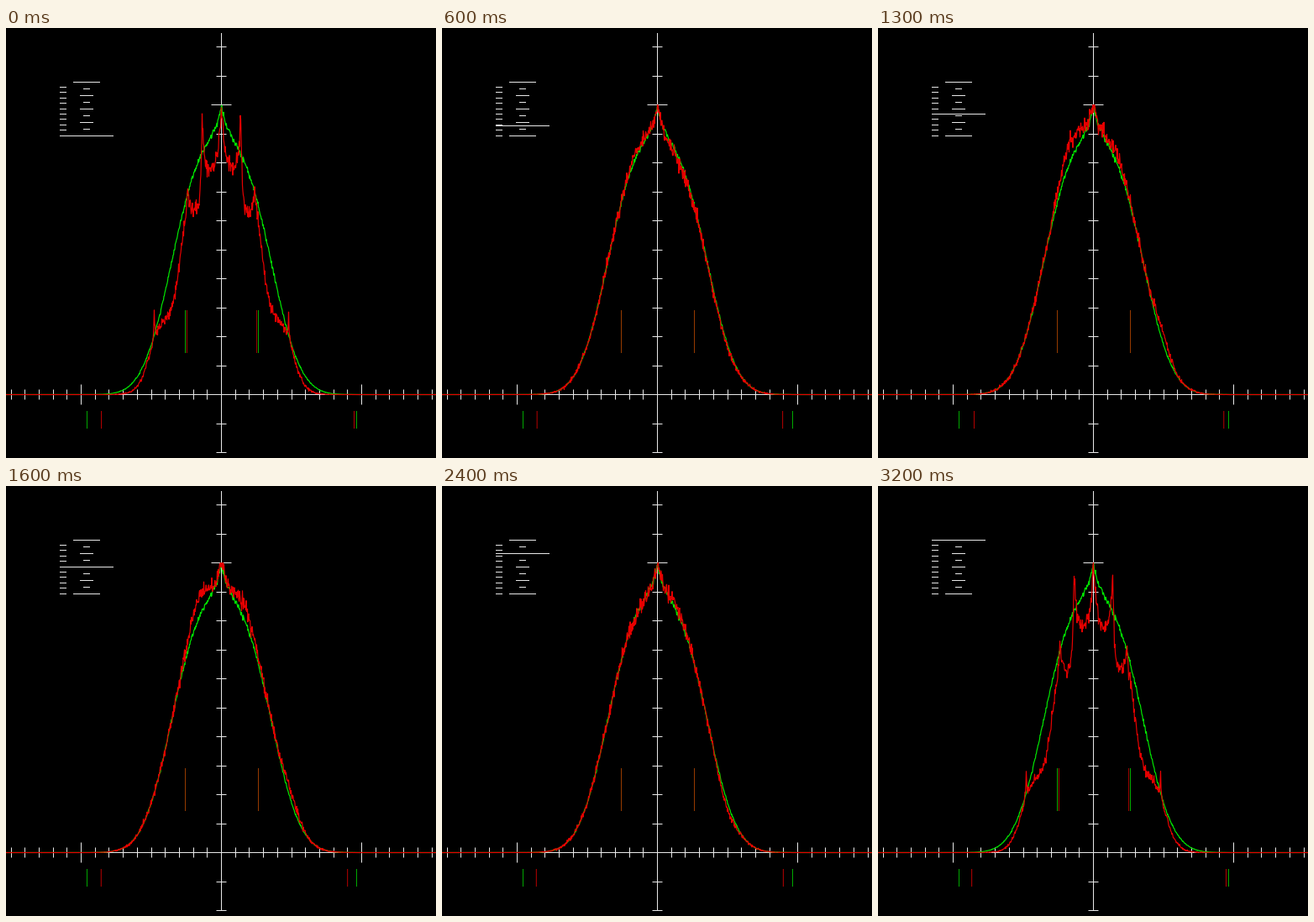
Recreate the animation shown at these times as a matplotlib script. Size 512x512 px, loop 3.3 s.

```python
import numpy as np
import matplotlib.pyplot as plt
from matplotlib.animation import FuncAnimation
from matplotlib.collections import LineCollection

SIZE, DPI, FRAMES = 512, 100, 33
CX, BASE, TOP = 256.5, 436.5, 345
RED, GREEN, DARK_GREEN, WHITE = "#e60000", "#00e600", "#00a800", "#e8e8e8"
PX = 72 / DPI

x = np.arange(0, SIZE + 0.5, 0.5)
off = x - CX
dist = np.abs(off)

# Spikes seen while all parts are in step: centre, height, width, drift per step
SPIKES = [(0, 78, 3.5, 2.8), (23, 75, 2, 3.2), (40, 39, 2.5, 2.8), (80, 32, 0.8, 0)]


def drop(at, width):
    return 1 / (1 + np.exp((dist - at) / width))


def lump(at, width):
    return np.exp(-(((off - at) / width) ** 2))


mean = 298 * np.exp(-((dist / 70) ** 2.7)) + 46 * np.exp(-dist / 9)
terraces = 50 * drop(24, 0.6) + 122 * drop(50, 4) + 95 * drop(85.5, 7)


def mixing(k):
    """0 when all parts are in step, 1 when fully mixed."""
    return min(k, FRAMES - 1 - k, 5) / 5


def profile(k):
    m = mixing(k)
    step = 5 * m
    h = (1 - m) * terraces + m * mean
    for centre, height, width, drift in SPIKES:
        reach = np.abs(dist - centre - drift * step)
        h = h + (1 - m) * height * np.exp(-reach / (width * (1 + 0.15 * step)))

    # Slow lopsided swelling while mixed
    sway = np.sin(np.pi * k / (FRAMES - 1))
    h = h + sway * (26 * np.sin(np.pi * (k - 3) / 20) * lump(-28, 16)
                    + 17 * np.sin(np.pi * (k - 10) / 16) * lump(28, 20)
                    + 14 * np.sin(np.pi * (k - 8) / 12) * lump(82, 13))
    return h


def noisy(h, amount, seed):
    rng = np.random.default_rng(seed)
    grain = amount * np.sqrt(np.maximum(h, 0) / TOP) * rng.normal(size=h.size)
    return BASE - np.clip(h + grain, 0, TOP)


fig = plt.figure(figsize=(SIZE / DPI, SIZE / DPI), dpi=DPI, facecolor="black")
ax = fig.add_axes([0, 0, 1, 1])
ax.set(xlim=(0, SIZE), ylim=(SIZE, 0))
ax.axis("off")


def hline(y, x0, x1):
    y = np.floor(y) + 0.5
    return [(x0, y), (x1, y)]


def vline(px, y0, y1):
    px = np.floor(px) + 0.5
    return [(px, y0), (px, y1)]


def strokes(segs, color, z=1):
    ax.add_collection(LineCollection(segs, colors=color, linewidths=PX,
                                     snap=False, zorder=z))


def trace(color, z, width=1.0, alpha=1.0):
    return ax.plot([], [], color=color, lw=width * PX, alpha=alpha, zorder=z,
                   snap=False, solid_capstyle="butt")[0]


# Axes with ticks
grid = [hline(BASE, 0, SIZE), vline(CX, 6, 506)]
for n in range(-15, 16):
    r = 12 if abs(n) == 10 else 6
    grid.append(vline(CX + n * 16.7, BASE - r, BASE + r))
for n in range(-2, 13):
    r = 12 if n == 10 else 6
    grid.append(hline(BASE - n * 34.5, CX - r, CX + r))

# Phase gauge
for n in range(1, 11):
    grid.append(hline(64 + 6.4 * n, 64, 72))
for n in range(9):
    r = 16 if n % 8 == 0 else 4 if n % 2 else 8
    grid.append(hline(64 + 8 * n, 96 - r, 96 + r))
strokes(grid, WHITE)

# Width and range marks of the average
strokes([vline(213, 336, 387), vline(300, 336, 387),
         vline(96, 456, 477), vline(417, 456, 477)], DARK_GREEN, 2)

average = trace(GREEN, 3, 1.2)
average.set_data(x, noisy(mean, 1.8, 5))

curve = trace(RED, 4, 1.2)
pointer = trace(WHITE, 4)
widths = [trace(RED, 3, alpha=0.65) for _ in range(2)]
ranges = [trace(RED, 3, alpha=0.8) for _ in range(2)]


def draw(k):
    curve.set_data(x, noisy(profile(k), 5.5, 100 + k))
    y = 128.5 - 2 * k
    pointer.set_data([64, 128], [y, y])

    spread = 41.5 + 2 * mixing(k)
    for line, side in zip(widths, (-1, 1)):
        px = CX + 0.5 + side * spread
        line.set_data([px, px], [336, 387])

    # The extremes jitter from sample to sample
    rng = np.random.default_rng(k)
    low = 112.5 + rng.uniform(-2, 2)
    high = 414 - 7 * mixing(k) + mixing(k) * rng.uniform(-6, 6)
    for line, px in zip(ranges, (low, high)):
        line.set_data([px + 0.5, px + 0.5], [456, 477])
    return [curve, pointer, *widths, *ranges]


anim = FuncAnimation(fig, draw, frames=FRAMES, interval=100, repeat=True,
                     repeat_delay=0, init_func=lambda: draw(0))
plt.show()
```
